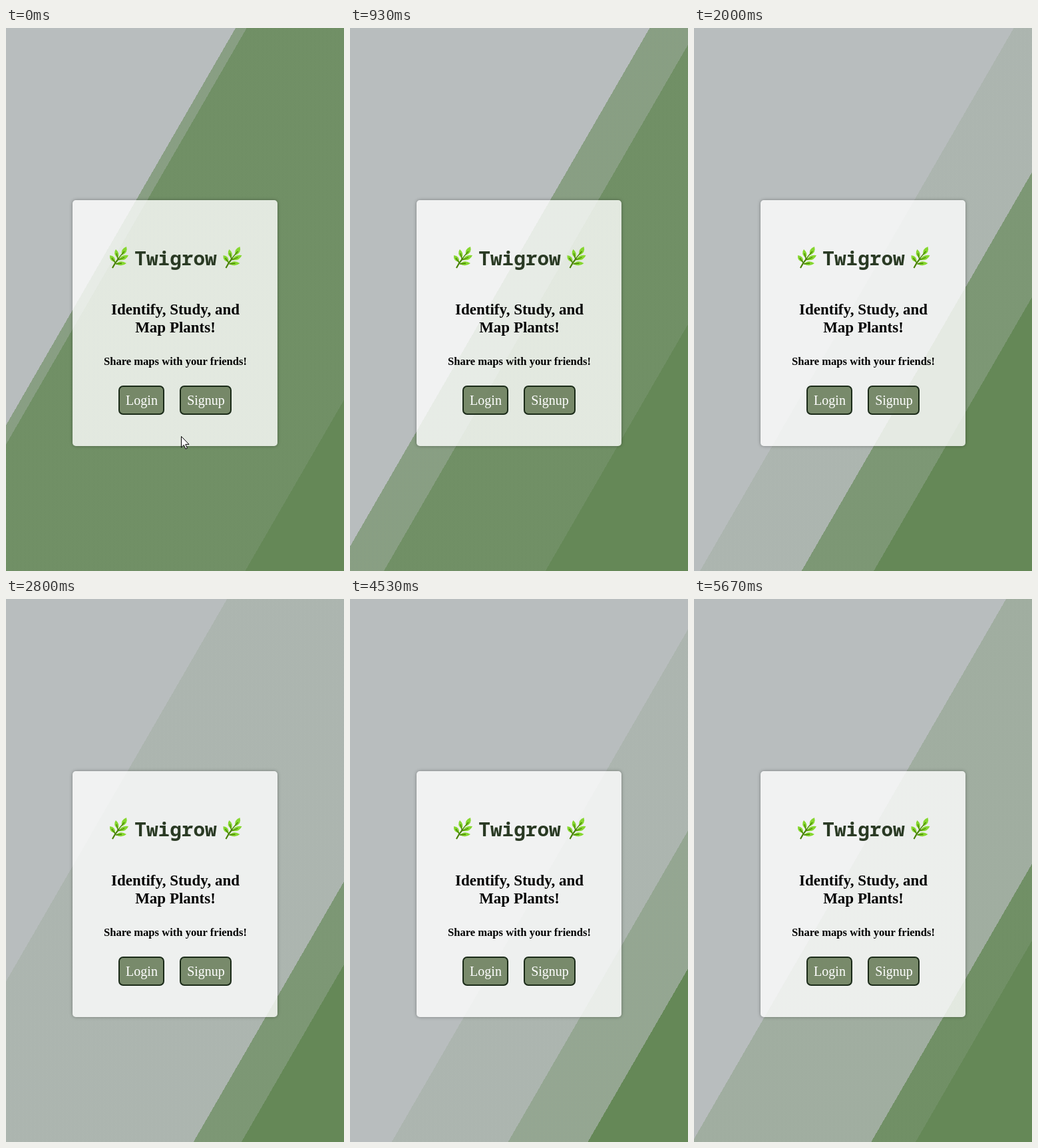
These frames come from a looping animation (508x817 px, 5.74 s). An HTML page:

```html
<!DOCTYPE html>
<html lang="en">
<head>
<meta charset="utf-8">
<title>Twigrow</title>
<style>
  html, body { margin: 0; width: 100%; height: 100%; overflow: hidden; background: #b8bdbe; }
  #stage { position: relative; width: 508px; height: 817px; overflow: hidden; }
  .slide {
    position: absolute; top: 0; left: -508px; width: 1524px; height: 817px;
    background: linear-gradient(-60deg, #658857 50%, #b8bdbe 50%);
  }
  .slide:nth-child(2) { opacity: .6667; }
  .slide:nth-child(3) { opacity: .5714; }
  .card {
    position: absolute; left: 100px; top: 259px; width: 308px; height: 370px;
    border-radius: 5px; background: rgba(255, 255, 255, .8); box-shadow: 0 0 5px rgba(0, 0, 0, .35);
  }
  svg { position: absolute; left: 0; top: 0; font-family: "Liberation Serif", "Times New Roman", serif; }
  text { text-anchor: middle; }
  .title { font: bold 29.4px "Noto Sans Mono", monospace; fill: #2a3a24; }
  .bold { font-weight: bold; }
  .button rect { fill: #5c714a; fill-opacity: .8; stroke: #1a2a18; stroke-width: 2; }
  .button text { font-size: 20px; fill: #fff; }
</style>
</head>
<body>
<div id="stage">
  <div class="slide"></div>
  <div class="slide"></div>
  <div class="slide"></div>
  <div class="card"></div>
  <svg width="508" height="817">
    <defs>
      <g id="herb">
        <g fill="#86d72f">
          <path d="M8 23Q-1 22 0 13Q9 14 8 23Z"/>
          <path d="M12 17Q4 11 9 4Q16 10 12 17Z"/>
          <path d="M18 13Q16 3 25 0Q28 9 18 13Z"/>
          <path d="M13 20Q18 11 28 13Q24 22 13 20Z"/>
          <path d="M9 26Q16 19 25 25Q18 31 9 26Z"/>
        </g>
        <path d="M4 32Q10 20 22 7M3 17L8 24M10 10L12 18M13 20L22 16M9 26L18 25" fill="none" stroke="#498205" stroke-width="1.3"/>
        <path d="M4 32Q8 24 14 17" fill="none" stroke="#498205" stroke-width="2"/>
      </g>
    </defs>
    <use href="#herb" x="156" y="329"/>
    <use href="#herb" x="326.5" y="329"/>
    <text class="title" x="255" y="357">Twigrow</text>
    <g class="bold">
      <text x="254.5" y="431" font-size="23">Identify, Study, and</text>
      <text x="254.5" y="458" font-size="23">Map Plants!</text>
      <text x="254.5" y="507" font-size="16.6">Share maps with your friends!</text>
    </g>
    <g class="button">
      <rect x="170" y="539" width="67" height="42" rx="6"/>
      <text x="204" y="567">Login</text>
      <rect x="262" y="539" width="76" height="42" rx="6"/>
      <text x="300.5" y="567">Signup</text>
    </g>
    <path id="cursor" d="M263.5 614.5V631L267.3 627.4L270 633.3L272.4 632.2L269.8 626.4H275Z" fill="#fff" stroke="#000"/>
  </svg>
</div>
<script>
  const LOOP = 5740, STEP = 200 / 3, LAST = 85;
  const START = 20828;         // how long the slides have been running when the loop begins
  const LOW = 80.5, SPAN = 518; // range of the diagonal at mid height
  const slides = [...document.querySelectorAll('.slide')];
  const cursor = document.getElementById('cursor');

  // cubic-bezier(.42, 0, .58, 1)
  function easeInOut(p) {
    let a = 0, b = 1;
    for (let i = 0; i < 24; i++) {
      const s = (a + b) / 2;
      if (s * (1.26 + s * (-.78 + s * .52)) < p) a = s; else b = s;
    }
    return a * a * (3 - 2 * a);
  }

  function alternate(time, duration, reverse) {
    const phase = time / duration % 2;
    const p = easeInOut(phase < 1 ? phase : 2 - phase);
    return reverse ? 1 - p : p;
  }

  function draw(now) {
    const t = now % LOOP;
    const time = Math.min(LAST, Math.floor((t + 4) / STEP)) * STEP;
    slides.forEach((slide, i) => {
      const x = LOW + SPAN * alternate(START + time, 3000 + i * 1000, i === 1);
      slide.style.transform = `translateX(${x - 254}px)`;
    });
    cursor.style.display = time < 199 ? '' : 'none';
  }

  const begin = performance.now();
  function frame() {
    draw(performance.now() - begin);
    requestAnimationFrame(frame);
  }
  frame();
</script>
</body>
</html>
```
